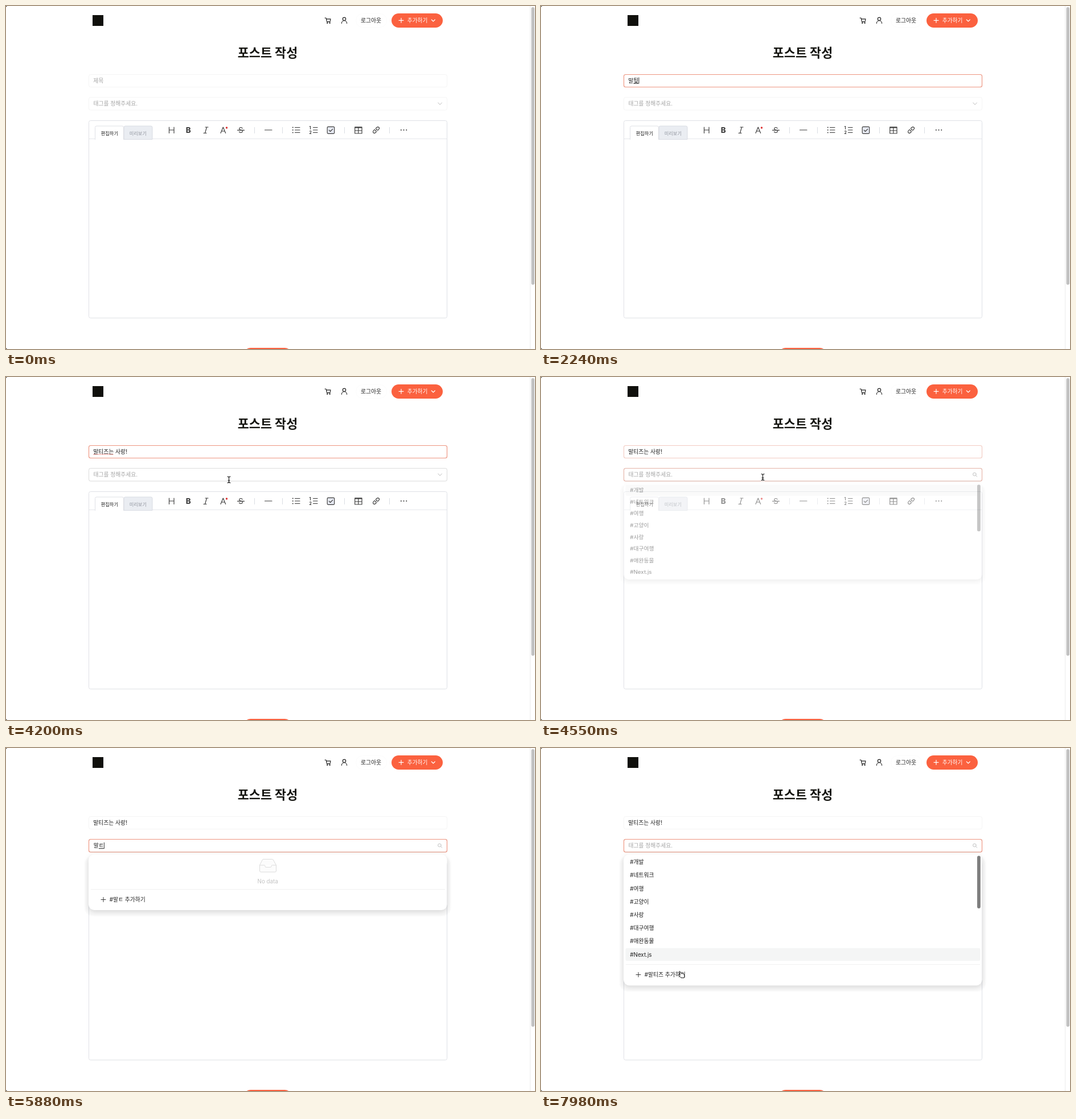
Animation, 929 px wide and 603 px high, one loop 8 s. Source, as an HTML page:

```html
<!DOCTYPE html>
<html lang="ko">
<head>
<meta charset="utf-8">
<title>포스트 작성</title>
<style>
  html, body { margin: 0; width: 100%; height: 100%; overflow: hidden; background: #fff; }
  svg { display: block; }
  text { font: 9.8px Inter, "Noto Sans CJK KR", "Noto Sans CJK JP", sans-serif; fill: #1d1d1d; white-space: pre; }
  .hint { fill: #a6a6a6; }
  .tab { font-size: 8.2px; font-weight: 500; }
  .line { fill: none; stroke: #3a3a3a; stroke-width: 1.15; stroke-linecap: round; stroke-linejoin: round; }
  .sep { stroke: #dadde3; fill: none; }
  .field { fill: #fff; stroke: #f5f5f5; }
  .focus { fill: none; stroke: #ee9580; stroke-width: 1.15; }
  .composing { text-decoration: underline; }
  .panel { fill: #fff; filter: drop-shadow(0 3px 4px rgba(0,0,0,.13)); }
  .halo { fill: rgba(0,0,0,.028); filter: blur(1px); }
</style>
</head>
<body>
<svg width="929" height="603" viewBox="0 0 929 603">
  <!-- header -->
  <rect x="152" y="16" width="19" height="19" fill="#10100c"/>
  <g class="line" style="stroke:#222">
    <path d="M560 21h2l1.6 6.6h5.4l1-4.8h-7.5"/>
    <circle cx="564.3" cy="29.7" r=".6"/><circle cx="568.6" cy="29.7" r=".6"/>
    <circle cx="594" cy="22.8" r="2.7"/><path d="M589.4 30.4a4.6 4.6 0 0 1 9.2 0"/>
  </g>
  <rect x="614.5" y="13.5" width="54" height="24" rx="12" fill="none" stroke="#fcfcfc"/>
  <text x="623" y="28.6">로그아웃</text>
  <rect x="677" y="13" width="90" height="25" rx="12.5" fill="#fb613f"/>
  <path d="M690 25.3h8M694 21.3v8M747.3 24l3 3 3-3" class="line" style="stroke:#fff"/>
  <text x="704.8" y="28.6" style="fill:#fff;font-size:9.7px;font-weight:500">추가하기</text>
  <text x="459.5" y="90.3" text-anchor="middle" style="font-size:21.8px;font-weight:700;fill:#14140f">포스트 작성</text>

  <!-- title field -->
  <rect class="field" x="145.5" y="120.5" width="629" height="22" rx="3"/>
  <rect class="focus" id="titleFocus" x="145.5" y="120.5" width="629" height="22" rx="3"/>
  <text class="hint" id="titleHint" x="153.3" y="134.6">제목</text>
  <text id="title" x="153.3" y="134.6"><tspan></tspan><tspan class="composing"></tspan></text>
  <path id="spell" d="M153.5 136h35" stroke="#dc4a3c" stroke-width="1.2" stroke-dasharray="1.8 1.2"/>

  <!-- tag field -->
  <rect class="field" x="145.5" y="160.5" width="629" height="22.5" rx="3"/>
  <rect id="tagHover" x="145.5" y="160.5" width="629" height="22.5" rx="3" fill="none" stroke="#d9d9d9"/>
  <rect class="focus" id="tagFocus" x="145.5" y="160.5" width="629" height="22.5" rx="3"/>
  <text class="hint" id="tagHint" x="153.5" y="175.2">태그를 정해주세요.</text>
  <text id="tag" x="153.8" y="175.2"><tspan></tspan><tspan class="composing"></tspan></text>
  <path id="arrow" d="M758.8 170l3.3 3.5 3.3-3.5" class="line" style="stroke:#bbb;stroke-width:1"/>
  <path id="lens" d="M764.2 171a2.8 2.8 0 1 0-5.6 0a2.8 2.8 0 1 0 5.6 0M763.5 173l2.3 2.2" class="line" style="stroke:#c2c2c2;stroke-width:1"/>
  <path id="caret" stroke="#333" stroke-width="1"/>

  <!-- editor -->
  <rect x="145.5" y="201.5" width="629" height="347" rx="3" fill="#fff" stroke="#dfe1e6"/>
  <path class="sep" d="M146 233.5H774" style="stroke:#e6e8ec"/>
  <path d="M156.5 235V213.5q0-2.5 2.5-2.5H204q2.5 0 2.5 2.5V235" fill="#fff" stroke="#dfe1e6"/>
  <path d="M207 234.5V213.5q0-2.5 2.5-2.5H254.500q2.500 0 2.500 2.500V234.500z" fill="#eaedf2" stroke="#d9dce3"/>
  <text class="tab" x="166.800" y="226.500">편집하기</text>
  <text class="tab" x="216.800" y="226.500" style="fill:#92969f">미리보기</text>
  <path class="sep" d="M436.500 213v11M485.500 213v11M594.500 213v11M673.500 213v11"/>
  <g class="line">
    <path d="M286.500 213v10.500M295 213v10.500M286.500 218h8.500M350 213h5M347 223.500h5M352.500 213l-3 10.500"/>
    <path d="M377 223.500l4.300-10.500 4.300 10.500M378.600 220h5.400M406.500 218.300h12M454.500 218h12.500"/>
    <path d="M507.500 213.500h8.500M507.500 218h8.500M507.500 222.500h8.500M539.500 213.500h7.500M539.500 218h7.500M539.500 222.500h7.500"/>
    <path d="M503.700 213.500h.1M503.700 218h.1M503.700 222.500h.1" style="stroke-width:1.800"/>
    <rect x="564.200" y="212.300" width="12.500" height="12" rx="1.500" fill="#e6e9f2"/>
    <path d="M567.300 218.300l2.200 2.200 4.200-4.200"/>
    <path d="M612.700 212.800h12.300v11.200h-12.300zM612.700 214h12.300M612.700 219h12.300M618.800 214v10"/>
    <g transform="rotate(-45 650 218)"><path d="M649 215.600h-3.300a2.400 2.400 0 0 0 0 4.800h3.300M651 215.600h3.300a2.400 2.400 0 0 1 0 4.800h-3.300M647.500 218h5"/></g>
    <path d="M693.800 218h.1M698.500 218h.1M703.200 218h.1" style="stroke-width:1.900"/>
  </g>
  <circle cx="387.500" cy="214" r="1.700" fill="#e03030"/>
  <text x="315.800" y="223" style="font-size:13.500px;font-weight:700;fill:#333">B</text>
  <text x="408" y="223" style="font-size:13.500px;fill:#444">S</text>
  <text x="532.500" y="217" style="font-size:7px;font-weight:600">1</text>
  <text x="532.500" y="225" style="font-size:7px;font-weight:600">2</text>
  <rect x="417" y="601" width="85" height="25" rx="12.500" fill="#fb613f"/>

  <!-- dropdown -->
  <g id="drop">
    <rect class="halo" x="138.500" y="190" width="642" rx="14"/>
    <rect class="panel" x="145" y="187" width="629.500" rx="10"/>
    <g id="list">
      <rect id="active" x="148.500" width="623" height="22.500" rx="3" fill="#f4f5f5"/>
      <g id="items"></g>
      <rect x="766" y="189.500" width="5.800" height="92.500" rx="2.900" fill="#7e7e7e"/>
    </g>
    <g id="empty">
      <path d="M445.500 206l4.500-9q.8-1.500 2-1.500h15.500q1.200 0 2 1.500l5 9v10q0 2-2 2h-25q-2 0-2-2zh8q1.500 0 1.500 1.800t1.700 1.800h7.600q1.700 0 1.700-1.800t1.500-1.800h7" fill="#fcfcfc" stroke="#dcdcdc"/>
      <text x="459.700" y="237.700" text-anchor="middle" style="fill:#c3c3c3">No data</text>
    </g>
    <g id="footer">
      <path d="M149 0.500H771" stroke="#f1f1f1"/>
      <path d="M167 18.500h8M171 14.500v8" class="line" style="stroke-width:1"/>
      <text id="add" x="181.800" y="22"></text>
    </g>
  </g>

  <!-- page scrollbar and window corners -->
  <path d="M920.500 0V603" stroke="#ececec"/>
  <rect x="922.500" y="2" width="5.500" height="488" rx="2.700" fill="#c1c1c1"/>
  <path d="M0 0h2L0 2zM0 603v-2l2 2z" fill="#444"/>

  <!-- pointers, each drawn around its hot spot -->
  <g id="beam" fill="none" stroke-linecap="round">
    <path id="beamPath" d="M-2.500-5.500q2.500 0 2.500 2V3.500q0 2-2.500 2M2.500-5.500q-2.500 0-2.500 2V3.500q0 2 2.500 2M-1.500 1.500h3" stroke="#fff" stroke-width="2.600"/>
    <use href="#beamPath" style="stroke:#111"/>
    <path d="M-2.500-5.500q2.500 0 2.500 2V3.500q0 2-2.500 2M2.500-5.500q-2.500 0-2.500 2V3.500q0 2 2.500 2M-1.500 1.500h3" stroke="#111" stroke-width="1.100"/>
  </g>
  <path id="pointer" d="M0 0V10l2.300-2.100 1.600 3.600 1.700-.8-1.600-3.500h3.200z" fill="#111" stroke="#fff" stroke-width=".8"/>
  <path id="hand" d="M-1 .5q1-1.200 2 .2l1.700 3.600q.8-1 1.700-.1q1-.8 1.800.3q1.200-.5 1.600.8l.6 2.800q.2 1.300-.5 3.400h-5.400q-1-1.800-3.500-3.600q-1.300-1.200 0-1.800q.8-.2 1.900.8z" fill="#fff" stroke="#111" stroke-width="1" stroke-linejoin="round"/>
</svg>
<script>
const LOOP = 8000, STEP = 70, ROW = 23.2;
const $ = id => document.getElementById(id);
const show = (id, on) => { $(id).style.display = on ? '' : 'none'; };
const clamp = (v, a, b) => Math.min(b, Math.max(a, v));
const ramp = (t, a, b) => { const p = clamp((t - a) / (b - a), 0, 1); return 1 - (1 - p) ** 2; };
const within = (t, spans) => spans.some(([a, b]) => t >= a && t < b);

const tags = ['개발', '네트워크', '여행', '고양이', '사랑', '대구여행', '애완동물', 'Next.js'];
$('items').innerHTML = tags.map((s, i) => `<text x="156.3" y="${204.2 + i * ROW}">#${s}</text>`).join('');

// [time, committed text, syllable being composed]
const titleKeys = [
  [0, '', ''], [1610, '', 'ㅁ'], [1750, '', '마'], [1960, '', '말'], [2100, '말', '티'],
  [2240, '말', '틪'], [2380, '말티', '즈'], [2520, '말티', '즌'], [2590, '말티즈', '느'],
  [2730, '말티즈', '는'], [2800, '말티즈는 ', ''], [3010, '말티즈는 ', '사'],
  [3150, '말티즈는 ', '살'], [3220, '말티즈는 사', '라'], [3290, '말티즈는 사', '랑'], [3570, '말티즈는 사랑!', '']
];
const tagKeys = [
  [0, '', ''], [5320, '', 'ㅁ'], [5530, '', '마'], [5740, '', '말'], [5880, '말', 'ㅌ'],
  [6020, '말', '티'], [6160, '말', '틪'], [6230, '말티', '즈'], [7070, '', '']
];
// [time, x, y]
const moves = [
  [70, 682, 548], [350, 560, 390], [630, 430, 254], [770, 380, 138], [840, 375, 135],
  [3990, 377, 138], [4200, 391.5, 180.5], [4340, 389.5, 176],
  [6440, 389.5, 176], [6930, 359, 269.5], [7070, 358, 280], [7210, 353, 360], [7420, 353, 360], [7980, 243.5, 392.5]
];
const pointerOn = [[70, 1610], [3990, 5320], [6440, LOOP]];
const caretOn = {
  title: [[770, 1050], [1610, 3990]],
  tag: [[4620, 5110], [5320, 6580], [7490, 7980]]
};

const latest = (keys, t) => keys.filter(k => k[0] <= t).pop();

function position(t) {
  const i = moves.findIndex(m => m[0] > t);
  if (i < 0) return moves[moves.length - 1].slice(1);
  if (!i) return moves[0].slice(1);
  const [a, x, y] = moves[i - 1], [b, u, v] = moves[i], p = (t - a) / (b - a);
  return [x + (u - x) * p, y + (v - y) * p];
}

function type(id, keys, t) {
  const [, done, part] = latest(keys, t), [a, b] = $(id).children;
  a.textContent = done;
  b.textContent = part;
  show(id + 'Hint', !(done + part));
  return done + part;
}

function drawCaret(t) {
  const id = ['title', 'tag'].find(k => within(t, caretOn[k]));
  show('caret', id);
  if (!id) return;
  const x = +$(id).getAttribute('x') + $(id).getComputedTextLength() + .5;
  $('caret').setAttribute('d', `M${x} ${id === 'title' ? 125.5 : 166}v11`);
}

function drawDropdown(t, y, text) {
  const p = ramp(t, 4480, 4760), empty = t >= 5530 && t < 7070, added = t >= 7070;
  const bottom = empty ? 285 : added ? 417.5 : 377.5;
  show('drop', p > 0);
  $('drop').style.opacity = p;
  $('drop').setAttribute('transform', `translate(0 ${187 * .2 * (1 - p)}) scale(1 ${.8 + .2 * p})`);
  const [halo, panel] = $('drop').children;
  halo.setAttribute('height', bottom + 10 - 190);
  panel.setAttribute('height', bottom - 187);
  show('list', !empty);
  show('empty', empty);
  show('footer', empty || added);
  $('footer').setAttribute('transform', `translate(0 ${empty ? 248 : 380})`);
  $('add').textContent = `#${added ? '말티즈' : text} 추가하기`;
  const row = added ? clamp(Math.floor((y - 189) / ROW), 0, 7) : 0;
  $('active').setAttribute('y', 189.3 + row * ROW);
}

function drawPointer(t, x, y) {
  const open = t >= 4550;
  const shape = t >= 7070 ? 'hand'
    : (y > 122 && y < 143) || (y > 160 && y < 184) || (!open && y > 235) ? 'beam' : 'pointer';
  for (const id of ['beam', 'pointer', 'hand']) {
    show(id, id === shape && within(t, pointerOn));
    $(id).setAttribute('transform', `translate(${x} ${y})`);
  }
}

function frame(now) {
  const t = Math.floor(now % LOOP / STEP) * STEP, [x, y] = position(t);
  type('title', titleKeys, t);
  const text = type('tag', tagKeys, t);
  const opened = ramp(t, 4480, 4690);
  $('titleFocus').style.opacity = ramp(t, 700, 910) * (1 - opened);
  $('tagHover').style.opacity = ramp(t, 4060, 4270);
  $('tagFocus').style.opacity = opened;
  show('spell', t >= 2800 && t < 4550);
  show('arrow', t < 4550);
  show('lens', t >= 4550);
  drawCaret(t);
  drawDropdown(t, y, text);
  drawPointer(t, x, y);
  requestAnimationFrame(frame);
}
requestAnimationFrame(frame);
</script>
</body>
</html>
```
